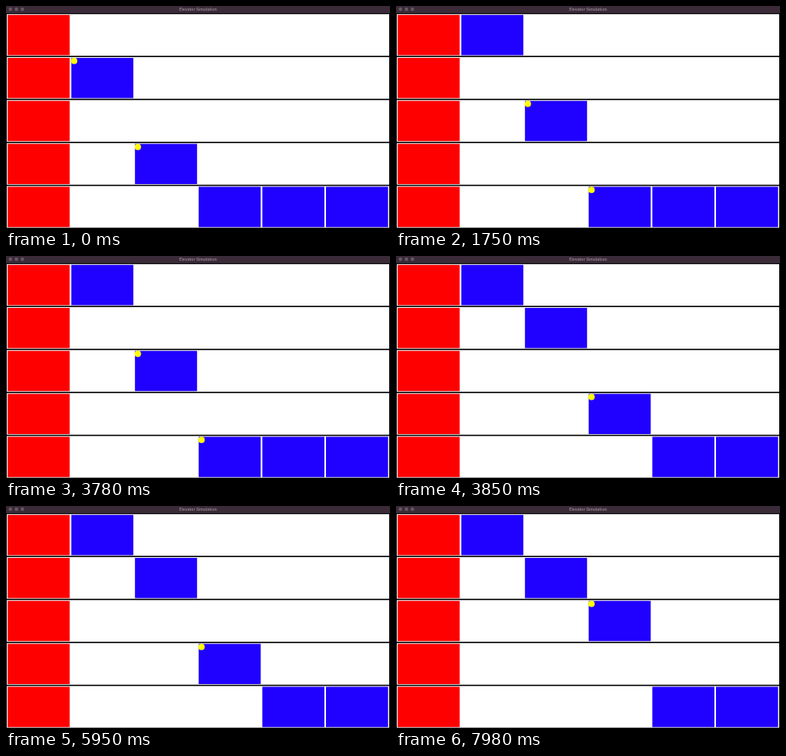
An HTML page with a canvas for the animation above (8 s loop, 480 by 278 pixels).

```html
<!DOCTYPE html>
<html lang="en">
<head>
<meta charset="utf-8">
<title>Elevator Simulation</title>
<style>
  html, body { margin: 0; width: 100%; height: 100%; overflow: hidden; background: #000; }
  canvas { display: block; width: 480px; height: 278px; }
</style>
</head>
<body>
<canvas id="stage" width="480" height="278"></canvas>
<script>
const ctx = document.getElementById("stage").getContext("2d");
const LOOP = 8000;
const FLOORS = 5;
const FLOOR_HEIGHT = 53.8;
const COLUMN_WIDTH = 79.6;

// Floor index of each car from left to right; riders lists the cars carrying a dot.
const steps = [
  { from: 0, cars: [1, 3, 4, 4, 4], riders: [0, 1] },
  { from: 1750, cars: [0, 2, 4, 4, 4], riders: [1, 2] },
  { from: 3850, cars: [0, 1, 3, 4, 4], riders: [2] },
  { from: 6020, cars: [0, 1, 2, 4, 4], riders: [2] }
];

const floorTop = floor => 10.2 + floor * FLOOR_HEIGHT;
const columnLeft = column => 2 + column * COLUMN_WIDTH;

function rect(x, y, w, h, color) {
  ctx.fillStyle = color;
  ctx.fillRect(x, y, w, h);
}

function dot(x, y, radius, color) {
  ctx.fillStyle = color;
  ctx.beginPath();
  ctx.arc(x, y, radius, 0, Math.PI * 2);
  ctx.fill();
}

function cell(column, floor, color) {
  rect(columnLeft(column), floorTop(floor) + 1, 77.6, 50.4, color);
}

function titleBar() {
  rect(0, 0, 480, 9, "#3b2b39");
  [5.5, 13, 20.5].forEach(x => dot(x, 4, 2.2, "#665963"));
  ctx.fillStyle = "#8c808a";
  ctx.font = "bold 5px Inter, sans-serif";
  ctx.textAlign = "center";
  ctx.textBaseline = "middle";
  ctx.fillText("Elevator Simulation", 240, 4.2);
}

function draw(time) {
  const { cars, riders } = steps.findLast(step => time >= step.from);
  rect(0, 0, 480, 278, "#000");
  titleBar();
  for (let floor = 0; floor < FLOORS; floor++) {
    rect(1, floorTop(floor), 478, 52.2, "#fff");
    cell(0, floor, "#f00");
  }
  cars.forEach((floor, i) => cell(i + 1, floor, "#2000ff"));
  riders.forEach(i => dot(columnLeft(i + 1) + 3.6, floorTop(cars[i]) + 4.8, 4, "#ff0"));
}

function tick() {
  draw(performance.now() % LOOP);
  requestAnimationFrame(tick);
}
tick();
</script>
</body>
</html>
```
